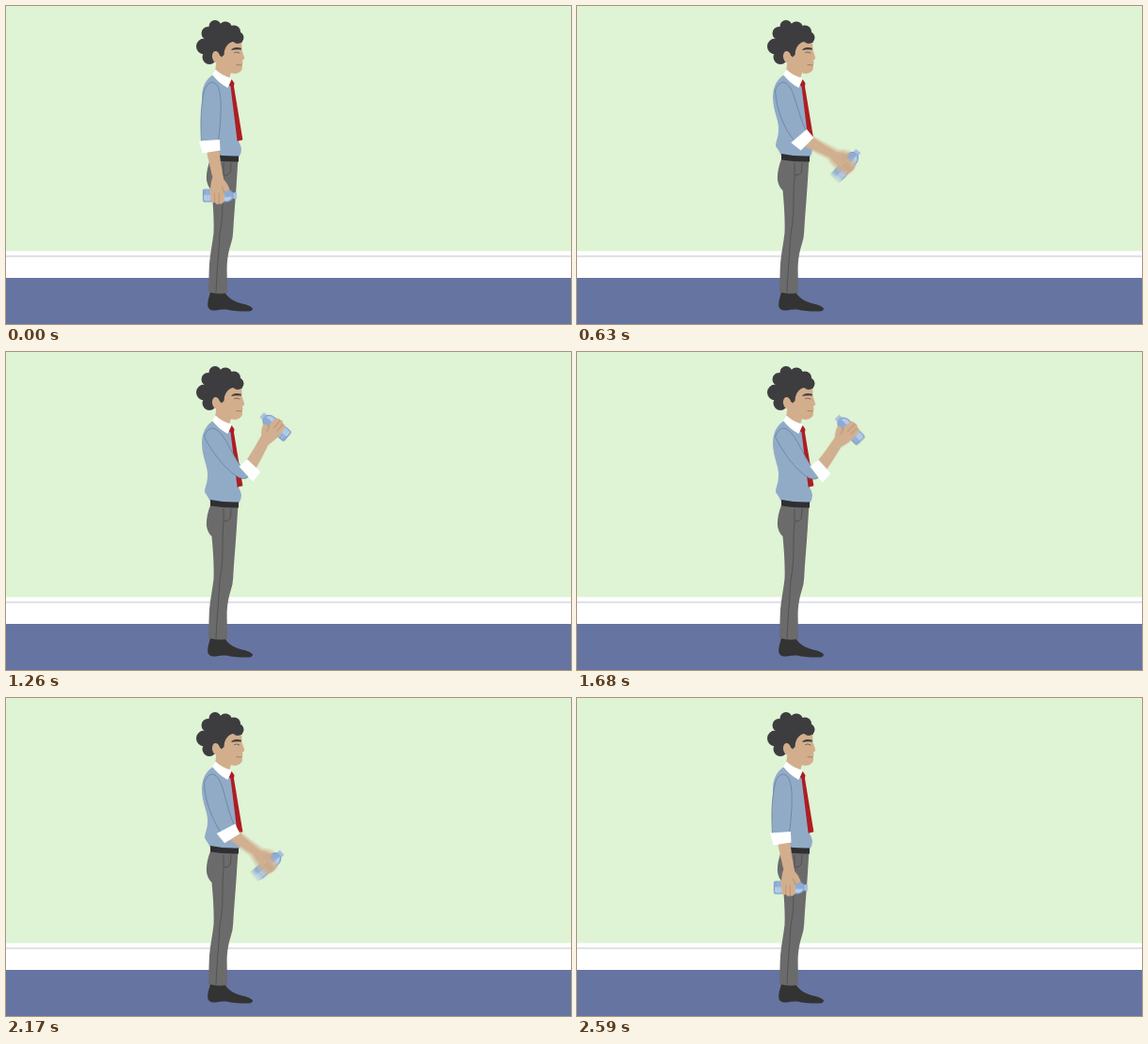
An HTML page with a canvas that plays this animation: 600x338 px, repeating every 2.87 s.

```html
<!DOCTYPE html>
<html lang="en">
<head>
<meta charset="utf-8">
<title>Raising a bottle</title>
<style>
  html, body { margin: 0; width: 100%; height: 100%; overflow: hidden; background: #dff3d5; }
  svg, canvas { position: absolute; left: 0; top: 0; width: 600px; height: 338px; }
  .line { fill: none; stroke-width: .8; stroke-linecap: round; stroke-linejoin: round; }
</style>
</head>
<body>
<svg viewBox="0 0 600 338">
  <!-- room -->
  <rect width="600" height="261" fill="#dff3d5"/>
  <rect y="260.500" width="600" height="30" fill="#fff"/>
  <rect y="265" width="600" height="2" fill="#dfe2e6"/>
  <rect y="289" width="600" height="49" fill="#6674a2"/>

  <!-- shoes and trousers -->
  <path fill="#333" d="M217 304C215 311 213 318 215 321Q217 324 223 323.500Q229 322 234 322.500Q244 325 258 324.500Q262 324 262 321.500C260 318 252 317 246 315Q237 312 232 304Z"/>
  <path fill="#6b6b6b" d="M217 163C214 171 212.500 178 213 185Q214 192 218.500 196C220 212 221 227 220.500 241C219 255 216 266 215.700 280L215 304Q225 307 235 305L234.600 281C234.600 270 236 262 238.500 254Q241 247 241.200 240C242 224 243.500 208 244.500 193L246.300 165Z"/>
  <path class="line" stroke="#4c4c4c" d="M231 167V180Q238 180 238.500 175L239 167M231 181Q230 192 230 201C230 216 230 228 227 242C226 262 224 281 223 304"/>

  <!-- shirt, belt, tie -->
  <path fill="#91abc7" d="M220 73C212 78 208 86 208 97C208 112 215 122 214 132C214 139 211 144 211 149Q214 153 217 159L247 161Q250 157 250 152Q249 147 247 144C245 122 244 102 241 86L235 78Z"/>
  <path fill="#2f2f31" d="M217 157Q232 160 247 159.500V165.500Q232 166 217 163.500Z"/>
  <path fill="#ad1e22" d="M235.500 83L239 77L242.500 82L242 85.500L251.400 142.300L245.600 143.800L238.500 85.500Z"/>

  <!-- head -->
  <path fill="#d3ae8c" d="M224 55L222 70L236 80L239 71Z"/>
  <path fill="#d3ae8c" d="M229 38L250 38Q250.500 43 250.500 47L253.200 55Q253 57 251 57.500L251.500 61L250.500 63L251 66Q250 71 243 72Q235 71 230 64L226 55Z"/>
  <path fill="#fff" d="M222.500 67.500C227 72 233 75 240 77L235.500 87Q226 82 219 73Z"/>
  <g fill="#3d3d40">
    <path d="M214 25L245 25L251 39Q243 36 238 39Q231.500 43 231.500 52L228 54L218 60L208 45Z"/>
    <circle cx="222" cy="21.500" r="6.500"/>
    <circle cx="233" cy="23.500" r="7"/>
    <circle cx="242" cy="27.500" r="7"/>
    <circle cx="246" cy="33.500" r="6.500"/>
    <circle cx="214.500" cy="29" r="7"/>
    <circle cx="210.500" cy="43" r="8.500"/>
    <circle cx="216" cy="54.500" r="7.500"/>
    <path d="M239.500 46Q243 42.500 249.800 44.800L249.800 46.600Q244 45.500 239.500 47Z"/>
  </g>
  <ellipse cx="223.200" cy="54.300" rx="4.200" ry="6.300" fill="#d3ae8c" transform="rotate(-12 223 54)"/>
  <path fill="#d3ae8c" d="M223 52L231 54V66L223 60Z"/>
  <path fill="#3d3d40" d="M226 42H232L231 52L229 54.500Q226 51 226 47Z"/>
  <path class="line" stroke="#6b5140" d="M242.500 49.500Q245 48 248 50"/>
  <path class="line" stroke="#a4704e" d="M245 62.500L250.500 63"/>
</svg>
<canvas id="arm"></canvas>

<script>
const LOOP = 2870, STEP = 70, SHUTTER = 28, SAMPLES = 8;
const DEG = Math.PI / 180;
const ratio = window.devicePixelRatio || 1;
const canvas = document.getElementById('arm');
canvas.width = 600 * ratio;
canvas.height = 338 * ratio;
const ctx = canvas.getContext('2d');
ctx.imageSmoothingQuality = 'high';

// forearm, hand and bottle move as one rigid piece, drawn hanging down;
// each part is a list of [path, fill, stroke]
const SKIN = '#d3ae8c', CREASE = '#b58d6b', SHIRT = '#91abc7';
const LIMB = [
  ['M232 195H211Q209 195 209 197V206Q209 208 211 208H232', '#8dacd3', '#7896c2'],
  ['M232 201H210V205.500Q210 207.300 211.500 207.300H232', '#b5cde9'],
  ['M213 195.500V207.500M216 195.500V207.500', null, '#a3bddd'],
  ['M212 150L215 165L219 182Q217 189 216.500 196L217.500 207Q219.500 210.500 221.500 208.500Q223.500 212 226 210Q229 211.500 231 208Q232.500 204 231.500 197L236 196.500Q237.500 196 236.800 193.500Q234.500 188 231 184.500L228 168L225.500 150Z', SKIN],
  ['M221.500 208.500V199M226 210V199M231.500 198L229 192', null, CREASE]
];
const NECK = [
  ['M230 195H235Q238.500 195.700 241 199V204Q238.500 207.300 235 208H230', '#8dacd3', '#7896c2'],
  ['M230 203H240Q238 206.500 235 207.300H230', '#b5cde9'],
  ['M241 198.300H244.800V205H241Z', '#a9bfdf']
];

const ZOOM = 3, BOX = { x: 200, y: 140, w: 54, h: 80 }, PIVOT = { x: 216.5, y: 149 };

function makeSprite(parts) {
  const sprite = document.createElement('canvas');
  sprite.width = BOX.w * ZOOM;
  sprite.height = BOX.h * ZOOM;
  const c = sprite.getContext('2d');
  c.scale(ZOOM, ZOOM);
  c.translate(-BOX.x, -BOX.y);
  c.lineCap = 'round';
  c.lineWidth = .8;
  for (const [d, fill, stroke] of parts) {
    const path = new Path2D(d);
    if (fill) { c.fillStyle = fill; c.fill(path); }
    if (stroke) { c.strokeStyle = stroke; c.stroke(path); }
  }
  return sprite;
}

const limb = makeSprite(LIMB), neck = makeSprite(NECK);

const ease = u => {
  u = Math.min(1, Math.max(0, u));
  return u < .5 ? 2 * u * u : 1 - 2 * (1 - u) * (1 - u);
};

// 0 = hanging, 1 = bottle near the mouth
const lift = t => ease((t - 140) / 1150) - ease((t - 1540) / 1030);

function pose(p) {
  const swing = (92 - 47 * (p + .45 * p * (1 - p))) * DEG;
  const reach = 64 - 7 * p;
  return {
    x: 219 + reach * Math.cos(swing),
    y: 85 + reach * Math.sin(swing),
    cuff: (87 - 128 * p + 34 * Math.sin(2 * Math.PI * p) * (1 - p) ** 2) * DEG,
    fore: -140 * p * DEG
  };
}

function place(sprite, p) {
  const q = pose(p);
  ctx.save();
  ctx.translate(q.x, q.y);
  ctx.rotate(q.fore);
  ctx.drawImage(sprite, BOX.x - PIVOT.x, BOX.y - PIVOT.y, BOX.w, BOX.h);
  ctx.restore();
}

function sleeve(p) {
  const q = pose(p), cos = Math.cos(q.cuff), sin = Math.sin(q.cuff);
  const at = (x, y) => [q.x + x * cos - y * sin, q.y + x * sin + y * cos];
  const elbow = at(-5.5, 9 - 5 * p);

  const outline = join => {
    ctx.beginPath();
    ctx.moveTo(219, 81);
    ctx.bezierCurveTo(231, 82, 229 + 10 * p, 115 - 7 * p, ...at(-5, -9));
    ctx[join](...elbow);
    ctx.bezierCurveTo(...at(-20, 9 - 2 * p), 206 + 16 * p, 110 + 3 * p, 210.5, 90);
    ctx.quadraticCurveTo(213, 82, 219, 81);
  };
  outline('lineTo');
  ctx.fillStyle = SHIRT;
  ctx.fill();
  outline('moveTo');
  ctx.strokeStyle = '#64809f';
  ctx.lineWidth = .8;
  ctx.stroke();

  ctx.beginPath();
  ctx.moveTo(...at(-6, 11.5));
  ctx.lineTo(...at(-6.5, -10.5));
  ctx.lineTo(...at(5, -10.5));
  ctx.lineTo(...at(7, 8.5));
  ctx.closePath();
  ctx.fillStyle = '#fff';
  ctx.fill();
}

function draw(t) {
  const p = lift(t);
  const count = p > 0 && p < 1 ? SAMPLES : 1;
  ctx.setTransform(ratio, 0, 0, ratio, 0, 0);
  ctx.clearRect(0, 0, 600, 338);

  // motion blur of the limb: average of poses while the shutter is open
  ctx.globalCompositeOperation = 'lighter';
  ctx.globalAlpha = 1 / count;
  for (let i = 0; i < count; i++) {
    place(limb, lift(t + SHUTTER * ((i + .5) / count - .5)));
  }
  // the bottle neck stays sharp, behind the hand
  ctx.globalAlpha = 1;
  ctx.globalCompositeOperation = 'destination-over';
  place(neck, p);
  ctx.globalCompositeOperation = 'source-over';
  sleeve(p);
}

const start = performance.now();
function frame() {
  const t = (performance.now() - start) % LOOP;
  draw(Math.floor(t / STEP) * STEP);
  requestAnimationFrame(frame);
}
frame();
</script>
</body>
</html>
```
